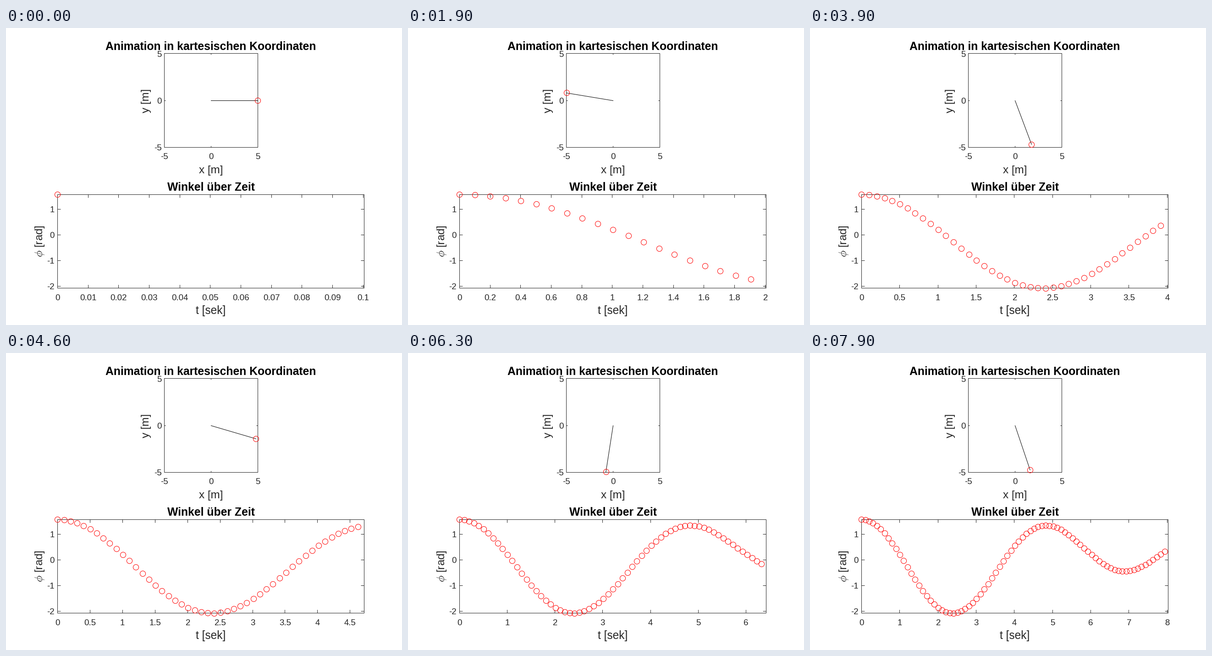
Animation, 864 px wide and 648 px high, one loop 8000 ms. Source, as a matplotlib script:

```python
import math

import numpy as np
import matplotlib.pyplot as plt
from matplotlib.animation import FuncAnimation

W, H = 864, 648
FRAMES, INTERVAL = 80, 100
DT = 0.1004
INK = "#262626"

plt.rcParams["font.family"] = "Liberation Sans"
plt.rcParams["mathtext.fontset"] = "cm"

# Plot frames in pixels: left, right, top, bottom
TOP = (345.0, 549.3, 55.95, 260.25)
BOT = (112.32, 781.92, 363.4, 567.7)
PIVOT, ROD = (447.12, 158.1), 102.15
ZERO, PER_RAD = 451.3, 55.95

# Swing angle in rad at every fourth time step
KNOTS = np.array([math.pi / 2, 1.329, 0.650, -0.279, -1.207, -1.863, -2.082,
                  -1.805, -1.145, -0.270, 0.552, 1.132, 1.343, 1.177, 0.725,
                  0.195, -0.243, -0.443, -0.339, 0.007, 0.440])


def spline(y, u):
    """Cubic spline on unit knots: at rest at the start, natural at the end."""
    n = len(y)
    a, b = np.eye(n), np.zeros(n)
    a[0, :2], b[0] = (2, 1), 6 * (y[1] - y[0])
    for i in range(1, n - 1):
        a[i, i - 1:i + 2] = 1, 4, 1
        b[i] = 6 * (y[i + 1] - 2 * y[i] + y[i - 1])
    m = np.linalg.solve(a, b)
    i = np.minimum(u.astype(int), n - 2)
    t = u - i
    s = 1 - t
    return (s * y[i] + t * y[i + 1]
            + ((s**3 - s) * m[i] + (t**3 - t) * m[i + 1]) / 6)


STEPS = np.arange(FRAMES)
PHI = spline(KNOTS, STEPS / 4)

fig = plt.figure(figsize=(W / 72, H / 72), dpi=72, facecolor="white")
ax = fig.add_axes([0, 0, 1, 1])
ax.set_xlim(0, W)
ax.set_ylim(H, 0)
ax.axis("off")


def crisp(v):
    """Centre of the pixel that holds v."""
    return np.floor(v) + 0.5


def line(xs=(), ys=(), color=INK, **kw):
    kw.setdefault("lw", 1)
    return ax.plot(xs, ys, color=color, snap=False, clip_on=False, **kw)[0]


def text(x, y, s="", size=18.67, ha="center", color=INK, **kw):
    return ax.text(x, y, s, fontsize=size, ha=ha, va="baseline",
                   color=color, rotation_mode="anchor", **kw)


def title(x, y, s):
    text(x, y, s, 24.7, color="black", weight="bold")


def box(frame):
    l, r, t, b = crisp(frame)
    line([l, r, r, l, l], [t, t, b, b, t], solid_joinstyle="miter")


def x_ticks(frame, xs, size):
    """Inward ticks on both horizontal edges as one broken path."""
    _, _, t, b = crisp(frame)
    px, py = [], []
    for x in crisp(xs):
        px += [x, x, np.nan, x, x, np.nan]
        py += [t, t + size, np.nan, b, b - size, np.nan]
    return px, py


def y_ticks(frame, ys, size):
    l, r, _, _ = crisp(frame)
    for y in crisp(ys):
        line([l, l + size], [y, y])
        line([r, r - size], [y, y])


# Cartesian view
box(TOP)
line(*x_ticks(TOP, [PIVOT[0]], 2.5))
y_ticks(TOP, [PIVOT[1]], 2.5)
for v in (-5, 0, 5):
    offset = v * ROD / 5
    text(PIVOT[0] + offset + 0.4, 286, str(v))
    text(339.5, PIVOT[1] - offset + 7, str(v), ha="right")
title(447, 47.5, "Animation in kartesischen Koordinaten")
text(447.1, 317, "x [m]", 24.3)
text(312, 158.5, "y [m]", 24.3, rotation=90)

# Angle over time
box(BOT)
for v in (1, 0, -1, -2):
    y = ZERO - PER_RAD * v
    y_ticks(BOT, [y], 6.5)
    text(106, y + 7, str(v), ha="right")
title(447, 355, "Winkel über Zeit")
text(447.1, 624, "t [sek]", 24.5)
text(80, 465, r"$\phi$ [rad]", 24.3, rotation=90)

time_ticks = line()
time_labels = [text(0, 594) for _ in range(11)]

rings = dict(ls="none", marker="o", ms=12.1, mfc="none", mew=1)
rod = line(color="black")
bob = line(color="red", **rings)
trace = line(color="red", **rings)


def tick_step(span):
    """Smallest 1-2-5 step with at most ten intervals."""
    e = math.floor(math.log10(span)) - 1
    steps = (m * 10.0**k for k in (e, e + 1) for m in (1, 2, 5))
    return next(s for s in steps if math.floor(span / s) <= 10)


def update(n):
    dx, dy = ROD * math.sin(PHI[n]), ROD * math.cos(PHI[n])
    hub_x, hub_y = crisp(PIVOT)
    rod.set_data([hub_x, PIVOT[0] + dx], [hub_y, hub_y + dy])
    bob.set_data([PIVOT[0] + dx], [PIVOT[1] + dy])

    left, right = BOT[:2]
    span = (n + 1) * DT
    scale = (right - left) / span
    trace.set_data(left + STEPS[:n + 1] * DT * scale,
                   ZERO - PER_RAD * PHI[:n + 1])

    step = tick_step(span)
    values = step * np.arange(math.floor(span / step) + 1)
    xs = left + values * scale
    time_ticks.set_data(*x_ticks(BOT, xs, 6.5))
    for i, label in enumerate(time_labels):
        shown = i < len(values)
        label.set_visible(shown)
        if shown:
            label.set_x(xs[i])
            label.set_text(f"{values[i]:.4g}")
    return [rod, bob, trace, time_ticks, *time_labels]


anim = FuncAnimation(fig, update, frames=FRAMES, interval=INTERVAL,
                     repeat=True, repeat_delay=0, blit=False)
plt.show()
```
